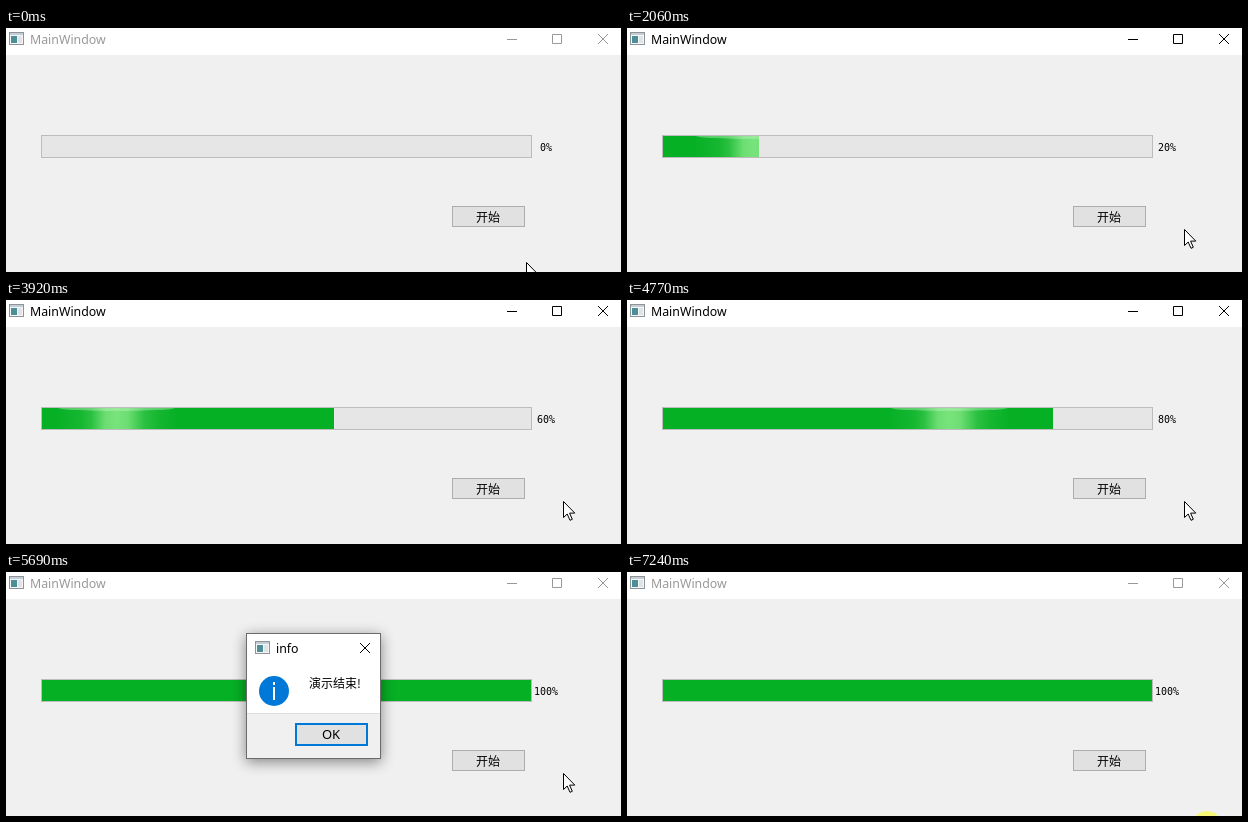
Recreate the animation shown at these times as an HTML page. Size 615 by 244 pixels, loop 7.32 s.

```html
<!DOCTYPE html>
<html lang="zh">
<head>
<meta charset="utf-8">
<title>MainWindow</title>
<style>
  html, body { margin: 0; width: 100%; height: 100%; overflow: hidden; background: #f0f0f0; }
  svg { display: block; }
  rect { shape-rendering: crispEdges; }
  text { font-family: "Noto Sans", "Open Sans", sans-serif; font-size: 12.35px; }
  .cjk { font-family: "Noto Sans CJK SC", "Noto Sans CJK", sans-serif; font-size: 12px; }
  .mono { font-family: "DejaVu Sans Mono", monospace; font-size: 10px; }
  .mid { text-anchor: middle; }
  .line { fill: none; stroke: currentColor; }
  #dialog { transform-origin: 308px 124px; }
  #panel { filter: drop-shadow(0 3px 7px rgba(0, 0, 0, .45)); }
</style>
</head>
<body>
<svg width="615" height="244" viewBox="0 0 615 244">
  <defs>
    <g id="icon">
      <rect width="15" height="13" fill="#8d9499"/>
      <rect x="1" y="1" width="13" height="2" fill="#c3cdd3"/>
      <rect x="1" y="3" width="13" height="9" fill="#f4f6f7"/>
      <rect x="2" y="4" width="6" height="7" fill="#4d8f96"/>
      <rect x="9" y="4" width="4" height="7" fill="#dfe3e6"/>
    </g>
    <path id="cross" d="M.5.5l10 10m0-10l-10 10"/>
    <linearGradient id="shine">
      <stop offset=".07" stop-color="#78e37c" stop-opacity="0"/>
      <stop offset=".25" stop-color="#78e37c" stop-opacity=".14"/>
      <stop offset=".32" stop-color="#78e37c" stop-opacity=".32"/>
      <stop offset=".42" stop-color="#78e37c" stop-opacity=".9"/>
      <stop offset=".5" stop-color="#78e37c"/>
      <stop offset=".58" stop-color="#78e37c" stop-opacity=".9"/>
      <stop offset=".7" stop-color="#78e37c" stop-opacity=".32"/>
      <stop offset=".8" stop-color="#78e37c" stop-opacity=".13"/>
      <stop offset=".93" stop-color="#78e37c" stop-opacity="0"/>
    </linearGradient>
    <clipPath id="filled"><rect id="clip" x="36" y="108" height="21"/></clipPath>
  </defs>

  <rect width="615" height="27" fill="#fff"/>
  <use href="#icon" x="3" y="4"/>
  <g id="title">
    <text x="24" y="16" fill="currentColor">MainWindow</text>
    <path class="line" d="M501 11.5h10M546.5 6.5h9v9h-9z"/>
    <use class="line" href="#cross" x="591.5" y="5.5"/>
  </g>

  <rect x="35.5" y="107.5" width="490" height="22" fill="#e6e6e6" stroke="#bcbcbc"/>
  <g clip-path="url(#filled)">
    <rect x="36" y="108" width="489" height="21" fill="#06b025"/>
    <g id="glow">
      <rect x="-70" y="108" width="140" height="21" fill="url(#shine)"/>
      <ellipse cy="108" rx="58" ry="3" fill="#c4f2c4" opacity=".4"/>
    </g>
  </g>
  <text id="percent" class="mono mid" x="540" y="123"></text>

  <rect id="start" x="446.5" y="178.5" width="72" height="20"/>
  <text class="cjk mid" x="482" y="194">开始</text>

  <g id="dialog">
    <rect id="panel" x="240.5" y="61.5" width="134" height="125" fill="#fff" stroke="#6b6b6b"/>
    <rect x="241" y="141" width="133" height="45" fill="#f0f0f0"/>
    <rect x="241" y="141" width="133" height="1" fill="#dfdfdf"/>
    <use href="#icon" x="249" y="69"/>
    <text x="270" y="81">info</text>
    <use class="line" href="#cross" x="353.5" y="70.5"/>
    <circle cx="268" cy="119" r="15" fill="#0078d7"/>
    <rect x="267" y="115" width="2" height="13" fill="#fff"/>
    <rect x="267" y="110" width="2" height="3" fill="#fff"/>
    <text class="cjk" x="303" y="116">演示结束!</text>
    <rect id="ok" x="290" y="152" width="71" height="21"/>
    <text class="mid" x="325" y="167" style="font-size:13px">OK</text>
  </g>

  <circle id="halo" r="15" fill="#ff0" opacity=".5"/>
  <path id="cursor" d="M.5.5V16.5L4.2 13 7 19.3 9.3 18.3 6.6 12.1H11.8Z" fill="#fff" stroke="#000"/>
</svg>

<script>
const LOOP = 7320, STEP = 77;
const el = Object.fromEntries([...document.querySelectorAll("svg [id]")].map(e => [e.id, e]));
const set = (e, attrs) => { for (const k in attrs) e.setAttribute(k, attrs[k]); };
const show = (e, on) => e.style.display = on ? "" : "none";
const clamp = v => Math.max(0, Math.min(1, v));

// pointer path: time, x, y
const path = [
  [0, 520, 234], [310, 487, 192], [460, 487, 192], [750, 600, 211], [865, 600, 211],
  [1135, 557, 201], [5780, 557, 201], [6230, 325, 163], [6545, 325, 163], [7080, 580, 254]
];

function pointer(t) {
  const i = path.findIndex(p => p[0] > t);
  if (i < 0) return path.at(-1).slice(1);
  const a = path[i - 1], b = path[i];
  const u = (t - a[0]) / (b[0] - a[0]), e = u * u * (3 - 2 * u);
  return [a[1] + (b[1] - a[1]) * e, a[2] + (b[2] - a[2]) * e].map(Math.round);
}

function paintButton(e, [x, y], pressed, isDefault) {
  const left = +e.getAttribute("x"), top = +e.getAttribute("y");
  const over = x > left && x < left + +e.getAttribute("width") &&
               y > top && y < top + +e.getAttribute("height");
  const idle = isDefault ? "#0078d7" : "#adadad";
  set(e, {
    fill: over ? (pressed ? "#cce4f7" : "#e5f1fb") : "#e1e1e1",
    stroke: over ? (pressed ? "#005499" : "#0078d7") : idle,
    "stroke-width": isDefault ? 2 : 1
  });
}

function draw(now) {
  const t = Math.floor((now % LOOP + 20) / STEP) * STEP;
  const during = (a, b) => t >= a && t < b;
  const pos = pointer(t);
  const level = Math.max(0, Math.min(5, Math.floor((t - 450) / 1000)));

  el.title.style.color = during(380, 5460) || during(6545, 7230) ? "#000" : "#999";
  el.percent.textContent = level * 20 + "%";
  set(el.clip, { width: level ? Math.floor(98.2 * level - 2) : 0 });

  // the shine crosses the bar at 250 px/s, then restarts
  const x = (t - (t < 3345 ? 1430 : 3345)) / 4 - 35;
  set(el.glow, { transform: `translate(${x} 0)` });
  show(el.glow, level > 0 && level < 5);

  const press = during(380, 455) || during(6450, 6545);
  paintButton(el.start, pos, press, false);
  paintButton(el.ok, pos, press, true);

  const open = clamp((t - 5460) / 200) * (1 - clamp((t - 6500) / 200));
  show(el.dialog, open > 0);
  el.dialog.style.opacity = open;
  el.dialog.style.transform = `scale(${0.9 + 0.1 * open})`;

  const place = { transform: `translate(${pos})` };
  set(el.cursor, place);
  set(el.halo, place);
  show(el.halo, press || t >= 7230);
}

function tick() {
  draw(performance.now() - begin);
  requestAnimationFrame(tick);
}
const begin = performance.now();
tick();
</script>
</body>
</html>
```
